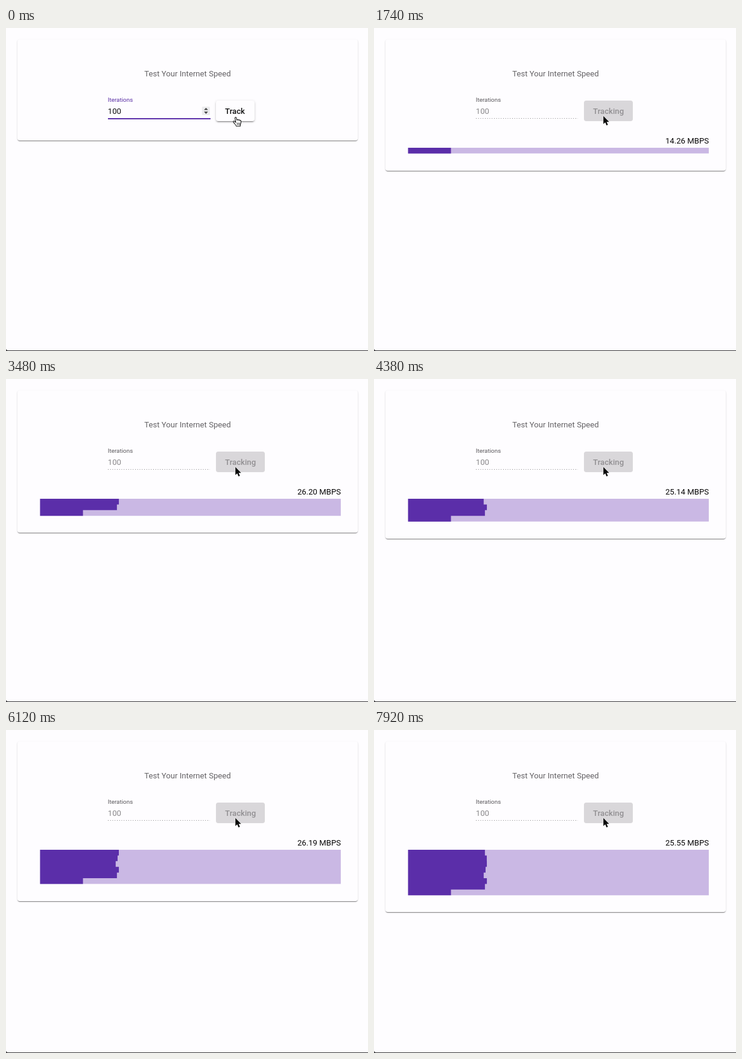
Animation, 600 px wide and 534 px high, one loop 8000 ms. Source, as an HTML page:

```html
<!DOCTYPE html>
<html lang="en">
<head>
<meta charset="utf-8">
<title>Speed test</title>
<style>
  html, body { margin: 0; width: 100%; height: 100%; overflow: hidden; background: #fefdff; }
  #stage { position: relative; width: 600px; height: 534px; overflow: hidden; }
  #stage > * { position: absolute; }
  #card {
    left: 19px; top: 19px; width: 564.4px; border-radius: 3.8px;
    box-shadow: 0 1.9px 1px -1px rgba(0,0,0,.28), 0 1px 1px rgba(0,0,0,.2), 0 1px 2.8px rgba(0,0,0,.13);
  }
  #button { left: 348px; top: 120px; height: 33.8px; border-radius: 3.8px; }
  #dots {
    left: 169px; top: 149px; width: 168.5px; height: 1px;
    background: linear-gradient(to right, rgba(0,0,0,.5) 33%, transparent 0) 0 0 / 3.764px 100%;
  }
  svg { left: 0; top: 0; }
  text { font: 13.16px Roboto, sans-serif; }
  #label { font-size: 9.87px; }
  #action { font-weight: 500; }
</style>
</head>
<body>
<div id="stage">
  <div id="card"></div>
  <div id="button"></div>
  <div id="dots"></div>
  <svg width="600" height="534" viewBox="0 0 600 534">
    <text x="301" y="80.3" text-anchor="middle" fill="#656366">Test Your Internet Speed</text>
    <text id="label" x="168.8" y="122">Iterations</text>
    <text id="count" x="168.8" y="141.7">100</text>
    <text id="action" x="363.1" y="141.6"></text>
    <text id="speed" x="555" y="190.6" text-anchor="end" fill="#080708"></text>

    <rect id="underline" x="169" width="170"/>
    <g id="spinner">
      <rect x="324.8" y="130" width="13.2" height="14" rx="1.5" fill="#ececee"/>
      <path d="M328.2 135.6L331.5 131.9L334.8 135.6ZM328.2 138.2L331.5 141.9L334.8 138.2Z" fill="#444"/>
    </g>

    <rect id="track" x="56.5" y="198" width="498.4" fill="#cab8e4"/>
    <path id="fill" fill="#5b2ea9"/>

    <g id="hand" stroke="#111" stroke-width="1.1" stroke-linejoin="round" stroke-linecap="round">
      <path fill="#fff" d="M380.9 156.2L379.5 149.2C379.2 147.1 381.5 146.8 382 148.8L382.9 152.4
        C383.3 151.1 385.1 151.2 385.3 152.4C385.9 151.4 387.4 151.7 387.5 153
        C388.3 152.3 389.5 152.8 389.5 154.2C389.7 157.2 389 158.7 388.3 160L388.3 162.2H381.5
        C381.2 160.2 378.6 158.1 377 155.6C376.2 154 377.8 153.2 379 154.3Z"/>
      <path fill="none" stroke-width=".8" d="M383.2 157V160M385.2 157V160M387.2 157V160"/>
    </g>
    <path id="arrow" d="M380.2 145.6V158.8L383.2 156.1L385.4 161L387.7 160L385.6 155.2H389.7Z"
      fill="#0a0a0a" stroke="#fff" stroke-width="1" stroke-linejoin="round" paint-order="stroke"/>

    <path d="M0 530.5Q.6 533 3.5 533H600V534H0Z" fill="#353436"/>
  </svg>
</div>
<script>
  const LOOP = 8000, PRESS = 60, START = 240, SETTLED = 420;
  const ROW = 9.41, BAR_LEFT = 56.5, BAR_TOP = 198, BAR_WIDTH = 498.4;
  const samples = [
    [1740, 14.26], [2580, 25.55], [3480, 26.20], [4380, 25.14],
    [5280, 25.77], [6120, 26.19], [7020, 26.17], [7920, 25.55]
  ];
  const RAISED = '0 2.8px 1px -1.9px rgba(0,0,0,.24), 0 1.9px 1.9px rgba(0,0,0,.17), 0 1px 4.7px rgba(0,0,0,.15)';
  const LIFTED = '0 4.7px 4.7px -2.8px rgba(0,0,0,.2), 0 7.5px 9.4px 1px rgba(0,0,0,.14), 0 2.8px 13px 2px rgba(0,0,0,.12)';

  const $ = id => document.getElementById(id);
  const show = (id, on) => { $(id).style.display = on ? '' : 'none'; };
  const setAttrs = (id, attrs) => {
    for (const key in attrs) $(id).setAttribute(key, attrs[key]);
  };
  const mix = (from, to, p) => `rgb(${from.map((v, i) => Math.round(v + (to[i] - v) * p))})`;
  const easeOut = p => 1 - (1 - p) ** 2;

  function drawBars(values) {
    let y = BAR_TOP, path = `M${BAR_LEFT} ${y}`;
    for (const value of [...values].reverse()) {
      path += `H${BAR_LEFT + BAR_WIDTH * value / 100}V${y += ROW}`;
    }
    setAttrs('fill', { d: values.length ? `${path}H${BAR_LEFT}Z` : '' });
    setAttrs('track', { height: values.length * ROW });
  }

  function drawButton(step, pressed, tracking, rippling) {
    const radius = 42 * easeOut(step / SETTLED);
    const ink = `rgba(0,0,0,${tracking ? .04 : .1})`;
    const style = $('button').style;
    style.width = tracking ? '81.4px' : '63.6px';
    style.backgroundColor = tracking ? '#d9d7da' : '#fefdff';
    style.backgroundImage = rippling
      ? `radial-gradient(circle at 32px 32px, ${ink} ${radius}px, transparent ${radius + .8}px)` : 'none';
    style.boxShadow = tracking ? 'none' : pressed ? LIFTED : RAISED;
    $('action').textContent = tracking ? 'Tracking' : 'Track';
    setAttrs('action', { fill: tracking ? '#918f92' : '#111' });
  }

  function render(t) {
    const step = Math.min(SETTLED, Math.floor(t / 60) * 60);
    const pressed = t >= PRESS, tracking = t >= START;
    const values = samples.filter(([time]) => t >= time).map(([, value]) => value);
    const count = values.length;

    drawButton(step, pressed, tracking, pressed && !count);
    drawBars(values);
    $('speed').textContent = tracking ? (count ? values[count - 1].toFixed(2) + ' ' : '') + 'MBPS' : '';
    const bottom = count ? BAR_TOP + ROW * count + 28.2 : tracking ? 195 : 185.6;
    $('card').style.height = bottom - 19 + 'px';

    setAttrs('label', { fill: mix([88, 44, 164], [88, 86, 90], easeOut(step / SETTLED)) });
    setAttrs('count', { fill: tracking ? '#8b898c' : '#111' });
    setAttrs('underline', pressed
      ? { y: 149, height: 1, fill: '#949295' }
      : { y: 149, height: 2, fill: '#5b2ea9' });
    show('underline', !tracking);
    show('dots', tracking);
    show('spinner', !pressed);
    show('hand', !tracking);
    show('arrow', tracking);
  }

  const origin = performance.now();
  function frame() {
    render((performance.now() - origin) % LOOP);
    requestAnimationFrame(frame);
  }
  frame();
</script>
</body>
</html>
```
